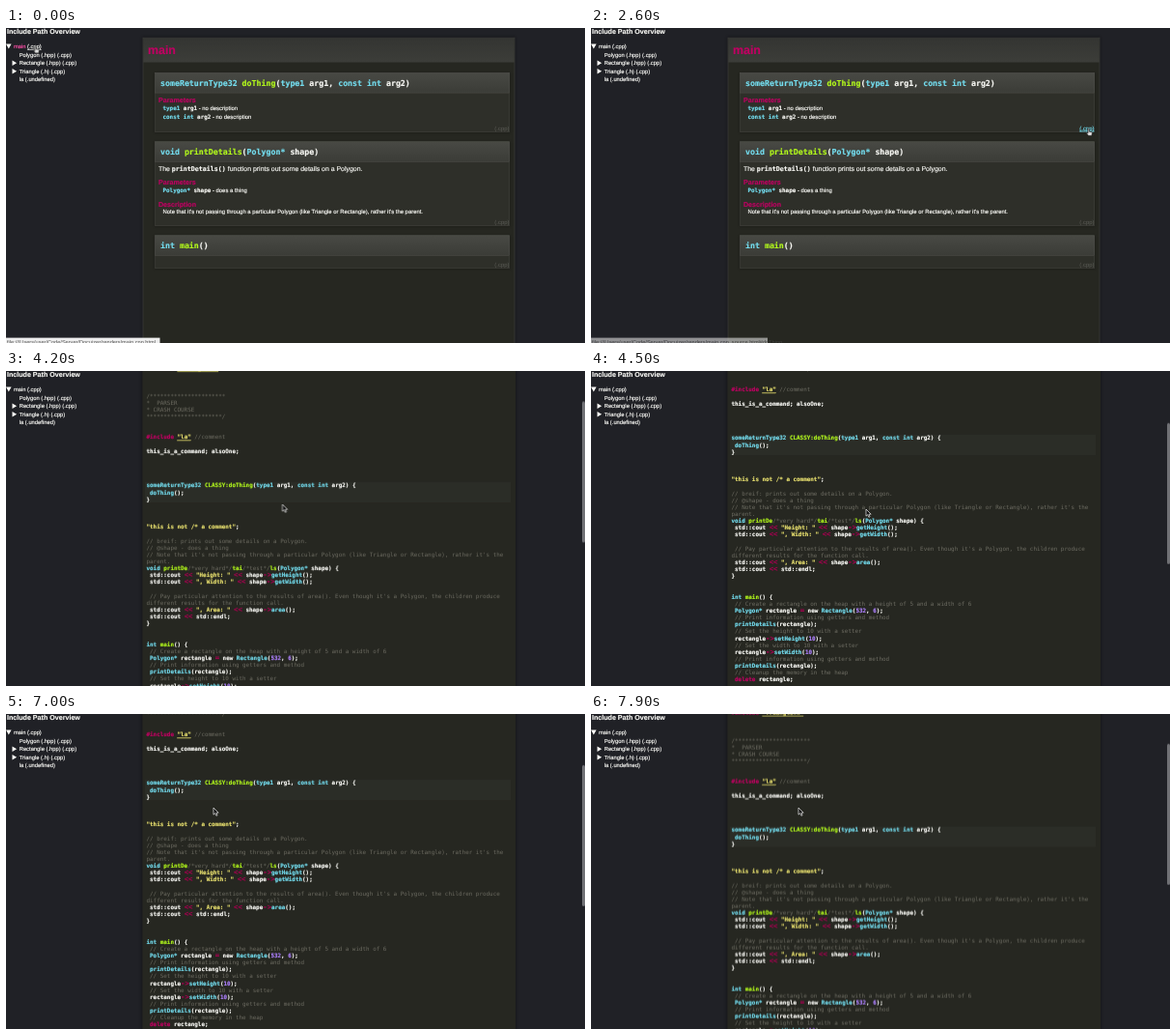
Write an HTML page that moves like this. It is 600 px wide and 326 px high and loops after 8000 ms.

```html
<!DOCTYPE html>
<html lang="en">
<head>
<meta charset="utf-8">
<title>Code documentation</title>
<style>
html, body { margin: 0; width: 100%; height: 100%; overflow: hidden; background: #202126; }
svg { display: block; width: 600px; height: 326px; }
text { white-space: pre; text-rendering: geometricPrecision; color: #fafaf6; }
text, tspan { fill: currentColor; stroke: currentColor; stroke-width: .16px; }
.sans { font-family: "Liberation Sans", Arial, sans-serif; }
.mono { font-family: "DejaVu Sans Mono", monospace; font-weight: bold; }
.strong { font-weight: bold; }
.w { color: #fafaf6; }
.b { color: #74def0; }
.g { color: #b2f81c; }
.y { color: #eae270; }
.u { color: #eae270; text-decoration: underline; }
.m { color: #c00062; }
.o { color: #a3004f; font-size: 7.3px; }
.p { color: #ae81ff; }
.c { color: #6d6c62; font-weight: normal; stroke: none; }
.s { font-family: "Liberation Sans", Arial, sans-serif; font-weight: normal; }
.dim { color: #5c5d57; stroke: none; }
.link { color: #74def0; text-decoration: underline; }
.hot { color: #ff4fa8; }
.hot .w { text-decoration: underline; }
.url { color: #555; stroke: none; }
</style>
</head>
<body>
<svg id="stage" viewBox="0 0 600 326">
  <defs>
    <linearGradient id="bar" x2="0" y2="1">
      <stop stop-color="#484944"/><stop offset="1" stop-color="#3b3c37"/>
    </linearGradient>
    <linearGradient id="top" x2="0" y2="1">
      <stop stop-color="#343532"/><stop offset="1" stop-color="#3c3d39"/>
    </linearGradient>
    <filter id="soft" x="-5%" y="-5%" width="110%" height="110%"><feGaussianBlur stdDeviation="1.5"/></filter>
  </defs>
</svg>
<script>
const LOOP = 8000, CODE = 5.925, LINE = 7.14;
const stage = document.getElementById('stage');

function add(parent, tag, attrs = {}) {
  const el = document.createElementNS('http://www.w3.org/2000/svg', tag);
  for (const k in attrs) el.setAttribute(k, attrs[k]);
  parent.append(el);
  return el;
}
const group = parent => add(parent, 'g');
const rect = (parent, x, y, width, height, fill, more) =>
  add(parent, 'rect', { x, y, width, height, fill, ...more });

// "|x" inside the string switches to class x
function text(parent, x, y, size, cls, str) {
  const el = add(parent, 'text', { x, y, class: cls, 'font-size': size });
  str.split('|').forEach((part, i) => {
    if (!i) return el.append(part);
    add(el, 'tspan', { class: part[0] }).textContent = part.slice(1);
  });
  return el;
}

// rows: [ms, ...values]
function anim(el, rows, make, easing = 'linear') {
  const frames = rows.map(([t, ...v]) => ({ offset: t / LOOP, easing, ...make(...v) }));
  el.animate(frames, { duration: LOOP, iterations: Infinity });
}
const move = (x, y) => ({ transform: `translate(${x}px, ${y}px)` });
const fade = opacity => ({ opacity });
const show = (el, ...spans) => {
  const rows = [[0, 0]];
  for (const [from, to] of spans) {
    if (!from) rows[0][1] = 1; else rows.push([from, 1]);
    if (to < LOOP) rows.push([to, 0]);
  }
  rows.push([LOOP, rows.at(-1)[1]]);
  anim(el, rows, fade, 'step-end');
};

// Documentation page
const SWAP = 2900;
const docs = group(stage);
rect(docs, 141, 9, 387, 330, '#0c0c0c', { filter: 'url(#soft)', opacity: .3 });
rect(docs, 142, 10.3, 385, 330, '#262721', { stroke: '#3a3b38', 'stroke-width': .8 });
rect(docs, 142.3, 10.5, 384.4, 25, 'url(#top)');
text(docs, 147, 27, 12.4, 'sans strong m', 'main');

function panel(y, h, title) {
  rect(docs, 154, y, 368.5, h + 1, '#0c0c0c', { filter: 'url(#soft)', opacity: .25 });
  rect(docs, 154.7, y, 367, h, '#2e2f29', { stroke: '#43443f', 'stroke-width': .6 });
  rect(docs, 154.7, y, 367, 20.5, 'url(#bar)', { stroke: '#50514c', 'stroke-width': .5 });
  text(docs, 160, y + 13.4, 8.27, 'mono', title);
  return text(docs, 506.3, y + h - 2, 5.95, 'sans dim', '(.cpp)');
}
const label = (y, str) => text(docs, 158, y, 7.1, 'sans strong m', str);
const item = (y, str) => text(docs, 162.5, y, CODE, 'mono', str);

const cppLink = panel(46.6, 60.9, '|bsomeReturnType32 |gdoThing|w(|btype1|w arg1, |bconst int|w arg2)');
label(77, 'Parameters');
item(85.2, '|btype1|w arg1|s - no description');
item(94.2, '|bconst int|w arg2|s - no description');

panel(117.8, 86.7, '|bvoid |gprintDetails|w(|bPolygon*|w shape)');
const intro = text(docs, 158, 148.4, 6.93, 'sans', 'The ');
add(intro, 'tspan', { class: 'mono', 'font-size': 6.65 }).textContent = 'printDetails()';
add(intro, 'tspan').textContent = ' function prints out some details on a Polygon.';
label(161.7, 'Parameters');
item(169.6, '|bPolygon*|w shape|s - does a thing');
label(184.7, 'Description');
text(docs, 162.5, 192.4, 5.92, 'sans',
  "Note that it's not passing through a particular Polygon (like Triangle or Rectangle), rather it's the parent.");

panel(214.8, 33.7, '|bint |gmain|w()');

const hover = text(docs, 506.3, 105.7, 5.95, 'sans link', '(.cpp)');
show(hover, [2400, SWAP]);
show(cppLink, [0, 2400], [SWAP, LOOP]);
show(docs, [0, SWAP]);

// Source page
const stars = '*'.repeat(22);
const source = `|c// Example Project
|c// Description: Main Program

|m#include|y <iostream>

|m#include |u"Polygon.hpp"
|m#include |u"Rectangle.hpp"
|m#include |u"Triangle.h"



|c/${stars}
|c*  PARSER
|c* CRASH COURSE
|c${stars}/


|m#include |u"la"|c //comment

this_is_a_command; alsoOne;




|bsomeReturnType32 |gCLASSY:doThing|w(|btype1|w arg1, |bconst int|w arg2) {
 |bdoThing|w();
}



|y"this is not /* a comment"|w;

|c// breif: prints out some details on a Polygon.
|c// @shape - does a thing
|c// Note that it's not passing through a particular Polygon (like Triangle or Rectangle), rather it's the
|cparent.
|bvoid |gprintDe|c/*very hard*/|gtai|c/*test*/|gls|w(|bPolygon*|w shape) {
 std::cout |o<<|y "Height: " |o<<|w shape|o->|bgetHeight|w();
 std::cout |o<<|y ", Width: " |o<<|w shape|o->|bgetWidth|w();

|c // Pay particular attention to the results of area(). Even though it's a Polygon, the children produce
|cdifferent results for the function call.
 std::cout |o<<|y ", Area: " |o<<|w shape|o->|barea|w();
 std::cout |o<<|w std::endl;
}


|bint |gmain|w() {
|c // Create a rectangle on the heap with a height of 5 and a width of 6
|b Polygon*|w rectangle |o=|w new |bRectangle|w(|p532|w, |p6|w);
|c // Print information using getters and method
|b printDetails|w(rectangle);
|c // Set the height to 10 with a setter
 rectangle|o->|bsetHeight|w(|p10|w);
|c // Set the width to 10 with a setter
 rectangle|o->|bsetWidth|w(|p10|w);
|c // Print information using getters and method
|b printDetails|w(rectangle);
|c // Cleanup the memory in the heap
|m delete|w rectangle;`;

const code = group(stage);
rect(code, 140.5, -5, 388, 336, '#0c0c0c', { filter: 'url(#soft)', opacity: .4 });
rect(code, 141.5, 0, 386.5, 326, '#262721');
const page = group(code);
const block = (line, count) =>
  rect(page, 144, 14 + (line - .5) * LINE, 379, count * LINE, '#2b2d27');
show(block(24, 3), [4000, 5300], [6500, LOOP]);
show(block(36, 9), [5300, 6500]);
source.split('\n').forEach((str, i) => {
  if (str) text(page, 145.5, 16.1 + i * LINE, CODE, 'mono', str);
});

const scroll = [[0, 0], [3800, 0], [3900, 28], [4000, 52], [4150, 55], [4300, 90], [4450, 115],
  [4500, 116], [6900, 116], [7200, 110], [7500, 97], [7900, 65.5], [LOOP, 58]];
anim(page, scroll, y => move(0, -y));

const thumb = rect(code, 597, 1, 3, 146, '#85868a', { rx: 1.5 });
anim(thumb, scroll, y => move(0, y * .455));
anim(thumb, [[0, 0], [3800, 0], [3900, .8], [5000, .8], [5300, 0], [6850, 0], [6950, .8], [LOOP, .8]], fade);
show(code, [SWAP, LOOP]);

// Sidebar
const side = group(stage);
text(side, 1, 6.2, 7.12, 'sans strong', 'Include Path Overview');
const mainItem = text(side, 8, 21, 5.75, 'sans', 'main (.cpp)');
const hotItem = text(side, 8, 21, 5.75, 'sans hot', 'main |w(.cpp)');
show(hotItem, [0, 600]);
show(mainItem, [600, LOOP]);
['Polygon (.hpp) (.cpp)', 'Rectangle (.hpp) (.cpp)', 'Triangle (.h) (.cpp)', 'la (.undefined)']
  .forEach((str, i) => text(side, 13.7, 29.7 + i * 8.5, 5.82, 'sans', str));
add(side, 'path', { d: 'M0 16.6h5.6l-2.8 5zM6.5 33.4v5.6l4.6-2.8zM6.5 41.9v5.6l4.6-2.8z', fill: '#fafaf6' });

// Status bar
function status(width, url, rows) {
  const bar = group(stage);
  rect(bar, 0, 320.6, width, 8, '#eee');
  text(bar, 1, 326.8, 5.6, 'sans url', url);
  anim(bar, rows, fade);
}
const base = 'file:///Users/user/Code/Server/Docuizer/renders/main.cpp';
status(159.5, base + '.html', [[0, 1], [1000, 1], [1200, 0], [LOOP, 0]]);
status(183, base + '_source.html#doThing',
  [[0, 0], [2450, 0], [2600, .55], [2700, .9], [SWAP, .9], [SWAP + 1, 0], [LOOP, 0]]);

// Pointer
const pointer = group(stage);
const ink = { 'stroke-linejoin': 'round', 'stroke-width': .7 };
const arrow = add(pointer, 'path',
  { d: 'M0 0v7.2l1.7-1.5 1.2 2.6 1.2-.6-1.2-2.5h2.3z', fill: '#111', stroke: '#eee', ...ink });
const hand = add(pointer, 'path',
  { d: 'M0 .6q.7-1 1.3 0v2.6l2.6.6q.7.3.5 1.2l-.6 2.6h-3.2l-2.2-2.8q0-.9.9-.5l.7.6z', fill: '#ddd', stroke: '#222', ...ink });
show(hand, [0, 600], [2400, SWAP]);
show(arrow, [600, 2400], [SWAP, LOOP]);
anim(pointer, [[0, 30, 18.5], [500, 30, 18.5], [800, 265, 70], [1000, 270, 70], [1400, 420, 66],
  [1800, 539, 96], [2100, 522, 103], [2400, 515, 104], [SWAP, 515, 104], [3400, 328, 150],
  [3600, 286.5, 138], [4200, 286.5, 138], [4500, 285, 143], [5100, 285, 143], [5500, 230, 172],
  [5800, 213, 177], [6100, 213, 177], [6600, 215, 97], [LOOP, 215, 97]], move);
</script>
</body>
</html>
```
